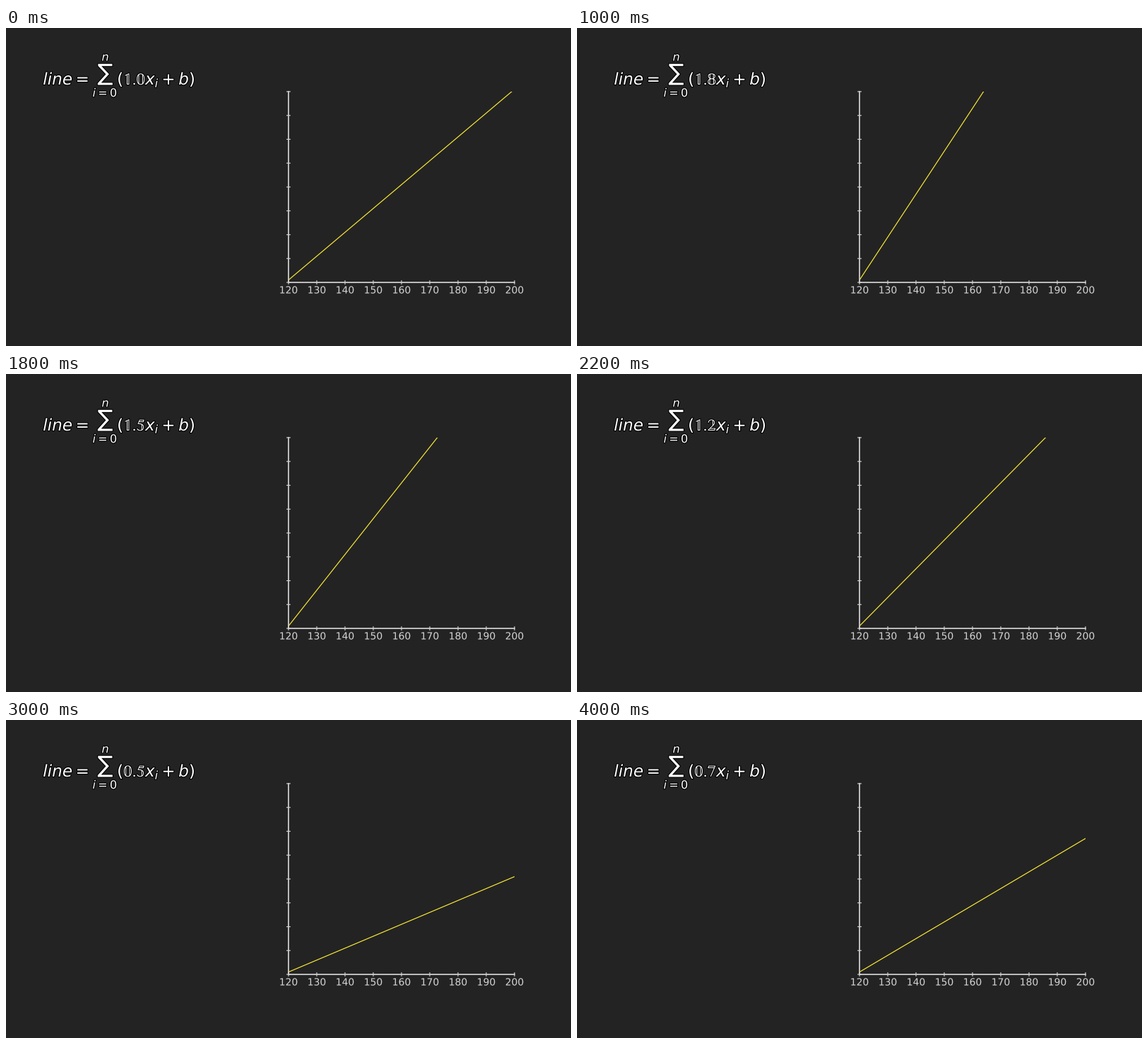
These frames come from a looping animation (800x450 px, 5000 ms). A matplotlib script:

```python
import matplotlib.pyplot as plt
import matplotlib.patheffects as pe
import numpy as np
from matplotlib.animation import FuncAnimation

BACK = "#232323"
GREY = "lightgray"
FRAMES, INTERVAL = 50, 100
LAST_STEP = 33
U = 800 / 1920  # design units per point, for a 1920 px wide layout

plt.rcParams["font.family"] = "DejaVu Sans"
plt.rcParams["mathtext.fontset"] = "dejavusans"
plt.rcParams["text.hinting"] = "none"

fig = plt.figure(figsize=(8, 4.5), dpi=100, facecolor=BACK)
ax = fig.add_axes([0.5, 0.2, 0.4, 0.6], facecolor=BACK)
ax.set(xlim=(120, 200), ylim=(0, 80))
ax.set_xticks(range(120, 201, 10))
ax.set_yticks(range(0, 81, 10), labels=[])
ax.tick_params(length=0, pad=8.5 * U, labelsize=24 * U, labelcolor=GREY)
for label in ax.get_xticklabels():
    label.set_path_effects([pe.Normal()])

ax.spines[["top", "right"]].set_visible(False)
for side in ("left", "bottom"):
    ax.spines[side].set(color=GREY, linewidth=3 * U, snap=False)

# Ticks straddle the axes, 2.9 px to each side.
tick = dict(color=GREY, linewidth=2 * U, clip_on=False, snap=False, zorder=3)
ax.vlines(ax.get_xticks(), -2.9 / 270, 2.9 / 270,
          transform=ax.get_xaxis_transform(), **tick)
ax.hlines(ax.get_yticks(), -2.9 / 320, 2.9 / 320,
          transform=ax.get_yaxis_transform(), **tick)

xs = np.arange(120, 201)
line, = ax.plot(xs, xs, color="#ffee33", linewidth=2 * U)


def math_text(x, y, va, text=""):
    outline = pe.withStroke(linewidth=4 * U, foreground="black")
    return fig.text(x, y, text, color="white", fontsize=40 * U,
                    ha="center", va=va, path_effects=[outline])


# The sum stands with its foot on the baseline, in a gap left by the formula.
math_text(0.1754, 0.85, "center", r"$\sum_{i=0}^n$")
formula = math_text(0.2, 0.8222, "baseline")


def slope_at(frame):
    """Slope climbs 1.0 to 2.0, falls to 0.2, then rises to 0.7 in tenths."""
    step = min((5 * frame + 2) // 6, LAST_STEP)
    return min(10 + step, 2 + abs(28 - step)) / 10


def draw(frame):
    slope = slope_at(frame)
    line.set_ydata(slope * (xs - 120) + 1)
    formula.set_text(
        rf"$line = \hspace{{1.539}}(\mathbb{{{slope:.1f}}}x_i + b)$")
    return line, formula


anim = FuncAnimation(fig, draw, frames=FRAMES, interval=INTERVAL, repeat=True)
plt.show()
```
